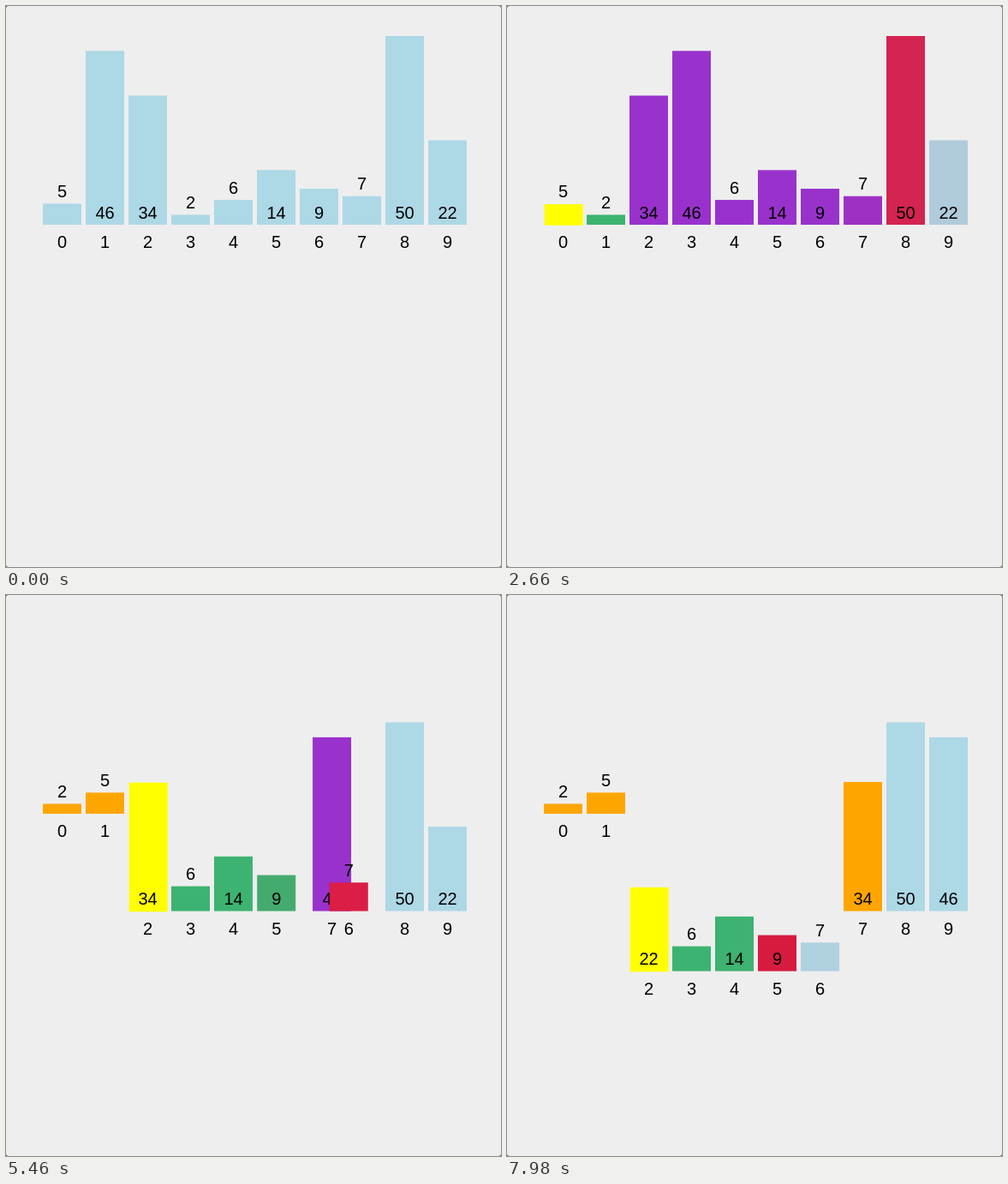
Recreate the animation shown at these times as an HTML page with a canvas. Size 578 by 654 pixels, loop 8000 ms.

```html
<!DOCTYPE html>
<html lang="en">
<head>
<meta charset="utf-8">
<title>Quick sort</title>
<style>
  html, body { margin: 0; width: 100%; height: 100%; overflow: hidden; background: #eee; }
  canvas { display: block; width: 578px; height: 654px; }
</style>
</head>
<body>
<canvas id="stage" width="578" height="654"></canvas>
<script>
const ctx = document.getElementById('stage').getContext('2d');

const LOOP = 8000, TICK = 70, FIRST_TICK = 840;
const START = 759, STEP = 183.8, MOVE = 250;   // a step cuts off the unfinished move before it
const LEFT = 43, PITCH = 50, BAR = 45;
const FLOORS = [255, 368.5, 438.5];

const PLAIN = [173, 216, 230], PIVOT = [255, 255, 0], CHECK = [220, 20, 60],
      SMALL = [60, 179, 113], LARGE = [153, 50, 204], SORTED = [255, 165, 0];

const values = [5, 46, 34, 2, 6, 14, 9, 7, 50, 22];
const bars = values.map((value, slot) => ({ value, slot, level: 0, color: PLAIN }));
const order = bars.slice();
const steps = [];

const record = () => steps.push(bars.map(b => ({
  slot: b.slot,
  // x, floor, red, green, blue, nudge
  pose: [LEFT + b.slot * PITCH, FLOORS[b.level], ...b.color, b.color === PIVOT ? 0.7 : 0]
})));

function swap(i, j) {
  [order[i], order[j]] = [order[j], order[i]];
  order[i].slot = i;
  order[j].slot = j;
  record();
}

function partition(lo, hi, level) {
  const pivot = order[lo];
  for (let i = lo; i <= hi; i++) order[i].level = level;
  pivot.color = PIVOT;
  record();
  let store = lo + 1;
  for (let i = store; i <= hi; i++) {
    const bar = order[i];
    bar.color = CHECK;
    record();
    if (bar.value < pivot.value) {
      swap(i, store++);
      bar.color = SMALL;
    } else {
      bar.color = LARGE;
    }
  }
  record();
  swap(lo, store - 1);
  for (let i = lo; i <= hi; i++) order[i].color = PLAIN;
  pivot.color = SORTED;
  record();
}

record();
partition(0, 9, 0);
order[0].color = SORTED;
record();
record();
partition(2, 9, 1);
partition(2, 6, 2);

const ease = p => p < 0.5 ? 4 * p ** 3 : 1 - 4 * (1 - p) ** 3;

function poseAt(index, t) {
  let pose = steps[0][index].pose, slot = index;
  for (let k = 1; k < steps.length; k++) {
    const elapsed = t - START - (k - 1) * STEP;
    if (elapsed <= 0) break;
    const p = ease(Math.min(elapsed, STEP) / MOVE);
    const last = elapsed > STEP && k === steps.length - 1;
    const goal = steps[k][index];
    pose = pose.map((v, i) => last ? goal.pose[i] : v + (goal.pose[i] - v) * p);
    slot = goal.slot;
  }
  return { pose, slot };
}

function drawBar(bar, index, t) {
  const { pose: [x, floor, r, g, b, nudge], slot } = poseAt(index, t);
  const height = 2.9 + 4.342 * bar.value;
  const mid = x + BAR / 2;
  ctx.fillStyle = `rgb(${Math.round(r)},${Math.round(g)},${Math.round(b)})`;
  ctx.fillRect(x + nudge, floor - height + nudge, BAR, height);
  ctx.fillStyle = '#000';
  ctx.fillText(bar.value, mid, height > 40 ? floor - 7.5 : floor - height - 7.5);
  ctx.fillText(slot, mid, floor + 27);
}

function draw(t) {
  ctx.fillStyle = '#555';
  ctx.fillRect(0, 0, 578, 654);
  ctx.fillStyle = '#eee';
  ctx.beginPath();
  ctx.roundRect(0, 0, 578, 654, 3);
  ctx.fill();
  ctx.font = '20px "Liberation Sans", Helvetica, Arial, sans-serif';
  ctx.textAlign = 'center';
  bars.forEach((bar, i) => drawBar(bar, i, t));
}

const origin = performance.now();
function frame() {
  const t = Math.max(0, performance.now() - origin) % LOOP;
  draw(t < FIRST_TICK ? 0 : Math.floor(t / TICK) * TICK);
  requestAnimationFrame(frame);
}
frame();
</script>
</body>
</html>
```
